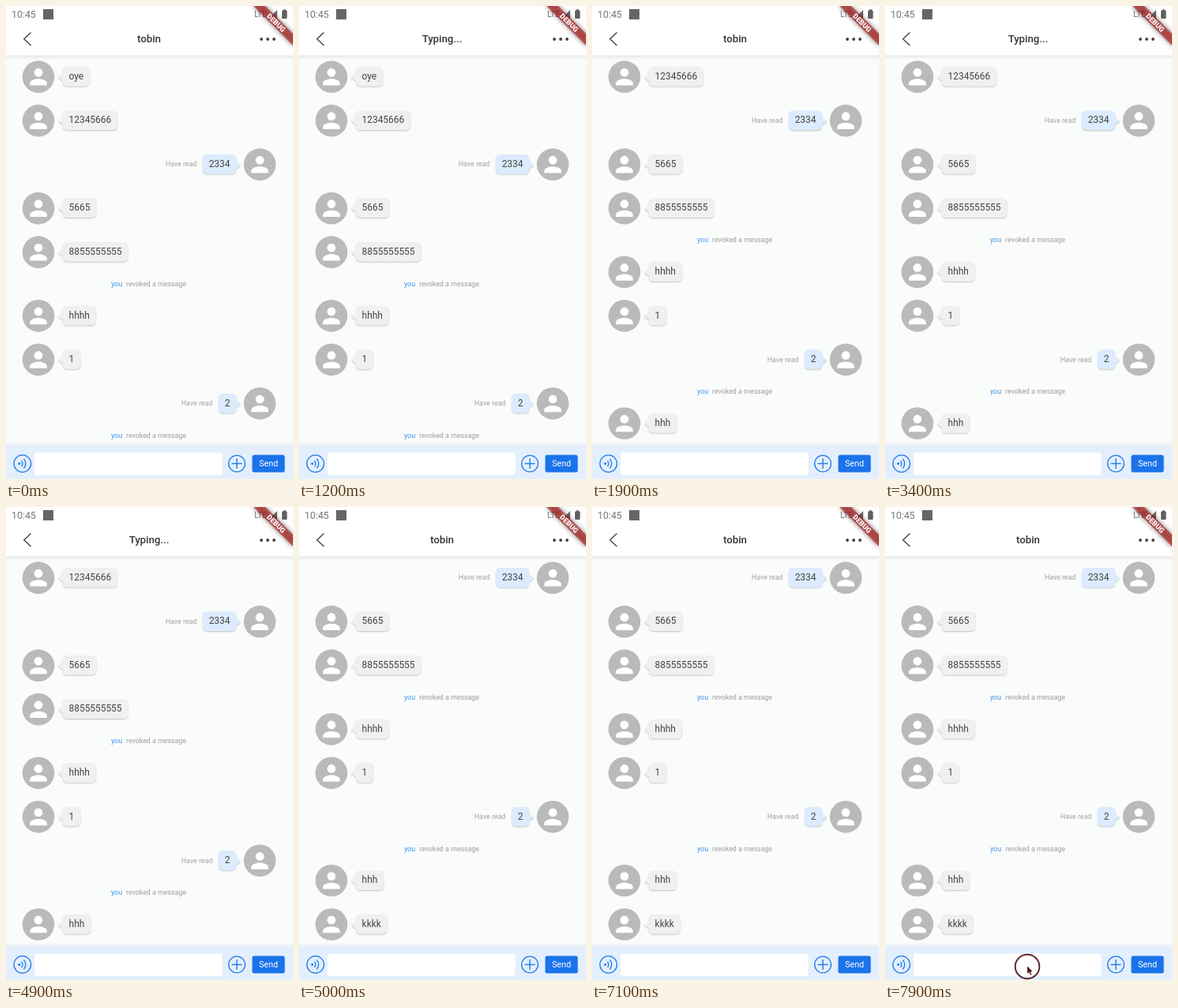
Recreate the animation shown at these times as an HTML page with a canvas. Size 363x599 px, loop 8 s.

```html
<!DOCTYPE html>
<html lang="en">
<head>
<meta charset="utf-8">
<title>Chat</title>
<style>
html, body { margin: 0; width: 100%; height: 100%; overflow: hidden; background: #fafcfc; }
canvas { display: block; width: 363px; height: 599px; }
</style>
</head>
<body>
<canvas id="stage"></canvas>
<script>
const W = 363, H = 599, LOOP = 8000;
const NAME = 'tobin';
const UNIT = 0.883;
const canvas = document.getElementById('stage');
const ctx = canvas.getContext('2d');
const ratio = window.devicePixelRatio || 1;
canvas.width = Math.round(W * ratio);
canvas.height = Math.round(H * ratio);

// Rows in order; 'in' = received, 'out' = sent, 'note' = system line.
const rows = [
  ['in', 'oye'], ['in', '12345666'], ['out', '2334'], ['in', '5665'],
  ['in', '8855555555'], ['note'], ['in', 'hhhh'], ['in', '1'],
  ['out', '2'], ['note'], ['in', 'hhh'], ['in', 'kkkk']
];
const ROW = 55.5, NOTE = 25.2, LIST_END = 556.3;

const FIRST = 1600, SECOND = 5000;
const typingSpans = [[600, FIRST], [2400, SECOND]];

function font(size, weight = 400) {
  ctx.font = `${weight} ${size}px Roboto, "Open Sans", sans-serif`;
}

function text(str, x, y, color, align = 'left') {
  ctx.fillStyle = color;
  ctx.textAlign = align;
  ctx.fillText(str, x, y);
}

function rect(x, y, w, h, color, r = 0) {
  ctx.fillStyle = color;
  ctx.beginPath();
  ctx.roundRect(x, y, w, h, r);
  ctx.fill();
}

function disc(x, y, r, color) {
  ctx.fillStyle = color;
  ctx.beginPath();
  ctx.arc(x, y, r, 0, Math.PI * 2);
  ctx.fill();
}

function ring(x, y, r, color, width, a = 0, b = Math.PI * 2) {
  ctx.strokeStyle = color;
  ctx.lineWidth = width;
  ctx.beginPath();
  ctx.arc(x, y, r, a, b);
  ctx.stroke();
}

function line(points, color, width) {
  ctx.strokeStyle = color;
  ctx.lineWidth = width;
  ctx.beginPath();
  points.forEach(([x, y]) => ctx.lineTo(x, y));
  ctx.stroke();
}

function shape(points, color) {
  ctx.fillStyle = color;
  ctx.beginPath();
  points.forEach(([x, y]) => ctx.lineTo(x, y));
  ctx.closePath();
  ctx.fill();
}

function shadow(color, blur, dy) {
  ctx.shadowColor = color;
  ctx.shadowBlur = blur * ratio;
  ctx.shadowOffsetY = dy * ratio;
}

function avatar(x, y) {
  disc(x, y, 20.3, '#bababa');
  ctx.save();
  ctx.translate(x, y);
  ctx.scale(1.35, 1.35);
  disc(0, -4, 4, '#fff');
  ctx.beginPath();
  ctx.moveTo(0, 2);
  ctx.bezierCurveTo(-2.67, 2, -8, 3.34, -8, 6);
  ctx.lineTo(-8, 8);
  ctx.lineTo(8, 8);
  ctx.lineTo(8, 6);
  ctx.bezierCurveTo(8, 3.34, 2.67, 2, 0, 2);
  ctx.fill();
  ctx.restore();
}

function bubble(str, y, sent) {
  font(11.9);
  const w = ctx.measureText(str).width + 15.2;
  const x = sent ? 291 - w : 72;
  const color = sent ? '#dcebfd' : '#f0f0f0';
  const edge = sent ? x + w : x, tip = sent ? 6 : -6;
  ctx.save();
  shadow('rgba(0,0,0,.24)', 2, 1);
  rect(x, y - 12.3, w, 24.2, color, 5);
  shape([[edge, y - 4], [edge + tip, y + .6], [edge, y + 5]], color);
  ctx.restore();
  rect(x, y - 12.3, w, 24.2, color, 5);
  text(str, x + 7.6, y + 3.2, '#444');
  if (sent) {
    font(8.83);
    text('Have read', x - 7.8, y + 2.8, '#a0a0a0', 'right');
  }
}

function note(y) {
  font(8.83);
  text('you', 133, y + 2.9, '#3f92ea');
  text('revoked a message', 152, y + 2.9, '#9c9c9c');
}

function list(count) {
  let bottom = LIST_END;
  for (let i = count - 1; i >= 0 && bottom > 50; i--) {
    const [kind, str] = rows[i];
    const h = kind === 'note' ? NOTE : ROW;
    const y = bottom - h / 2;
    if (kind === 'note') note(y);
    else {
      avatar(kind === 'in' ? 41 : 321, y);
      bubble(str, y, kind === 'out');
    }
    bottom -= h;
  }
}

function statusBar() {
  font(12.36);
  text('10:45', 7, 15.3, '#777');
  rect(47, 4, 13, 13, '#666');
  font(10);
  text('LTE', 314, 14, '#707070');
  shape([[343, 5], [343, 15.5], [332.5, 15.5]], '#707070');
  rect(349, 5.5, 6.5, 10.5, '#606060', 1);
  rect(350.8, 4.3, 3, 2, '#606060');
}

function header(title) {
  ctx.save();
  shadow('rgba(0,0,0,.12)', 5, 1);
  rect(-10, -10, W + 20, 72.5, '#fff');
  ctx.restore();
  statusBar();
  line([[31.5, 33.5], [22.8, 41.8], [31.5, 50]], '#444', 1.4);
  font(13.24, 500);
  text(title, 181, 46, '#3a3435', 'center');
  [323, 331, 339].forEach(x => disc(x, 42, 1.9, '#4a383b'));
}

function banner() {
  ctx.save();
  ctx.translate(W, 0);
  ctx.rotate(Math.PI / 4);
  ctx.scale(UNIT, UNIT);
  ctx.filter = `blur(${3 * ratio}px)`;
  rect(-40, 28, 80, 12, 'rgba(0,0,0,.5)');
  ctx.filter = 'none';
  rect(-60, 28, 120, 12, 'rgba(183,28,28,.627)');
  font(10.2, 900);
  text('DEBUG', 0, 37.6, '#fff', 'center');
  ctx.restore();
}

function footer() {
  const blue = '#1f7ae8', y = 579.5;
  ctx.save();
  shadow('rgba(60,90,130,.12)', 5, -1);
  rect(-10, 556.3, W + 20, 60, '#e4effd');
  ctx.restore();
  rect(36, 565.5, 237.5, 28.5, '#fff', 4);

  ring(20.8, y, 10.8, blue, 1.3);
  disc(16.8, y, 1.5, blue);
  ring(16, y, 5, blue, 1.3, -.8, .8);
  ring(16, y, 8.8, blue, 1.3, -.75, .75);

  ring(292, y, 10.4, blue, 1.3);
  line([[285.5, y], [298.5, y]], blue, 1.4);
  line([[292, y - 6.5], [292, y + 6.5]], blue, 1.4);

  rect(311.4, 568.5, 41.2, 22, '#1a73ea', 2.5);
  font(10.8);
  text('Send', 332, 583, '#fff', 'center');
}

function pointer(t) {
  const k = Math.min(1, (t - 7500) / 300);
  if (k <= 0) return;
  const x = 180, y = 582 + 40 * (1 - k) ** 3;
  ring(x, y, 15.3, '#63292b', 2);
  const arrow = [[0, 0], [0, 9.5], [2.2, 7.5], [4, 11.3], [5.5, 10.6], [3.8, 7], [6.6, 6.7]];
  shape(arrow.map(([a, b]) => [x + a, y + b - .5]), '#54191b');
}

function draw(t) {
  ctx.setTransform(ratio, 0, 0, ratio, 0, 0);
  rect(0, 0, W, H, '#fafcfc');
  const count = 10 + (t >= FIRST) + (t >= SECOND);
  const typing = typingSpans.some(([a, b]) => t >= a && t < b);
  list(count);
  footer();
  header(typing ? 'Typing...' : NAME);
  banner();
  pointer(t);
}

const start = performance.now();
function tick() {
  draw((performance.now() - start) % LOOP);
  requestAnimationFrame(tick);
}
tick();
</script>
</body>
</html>
```
